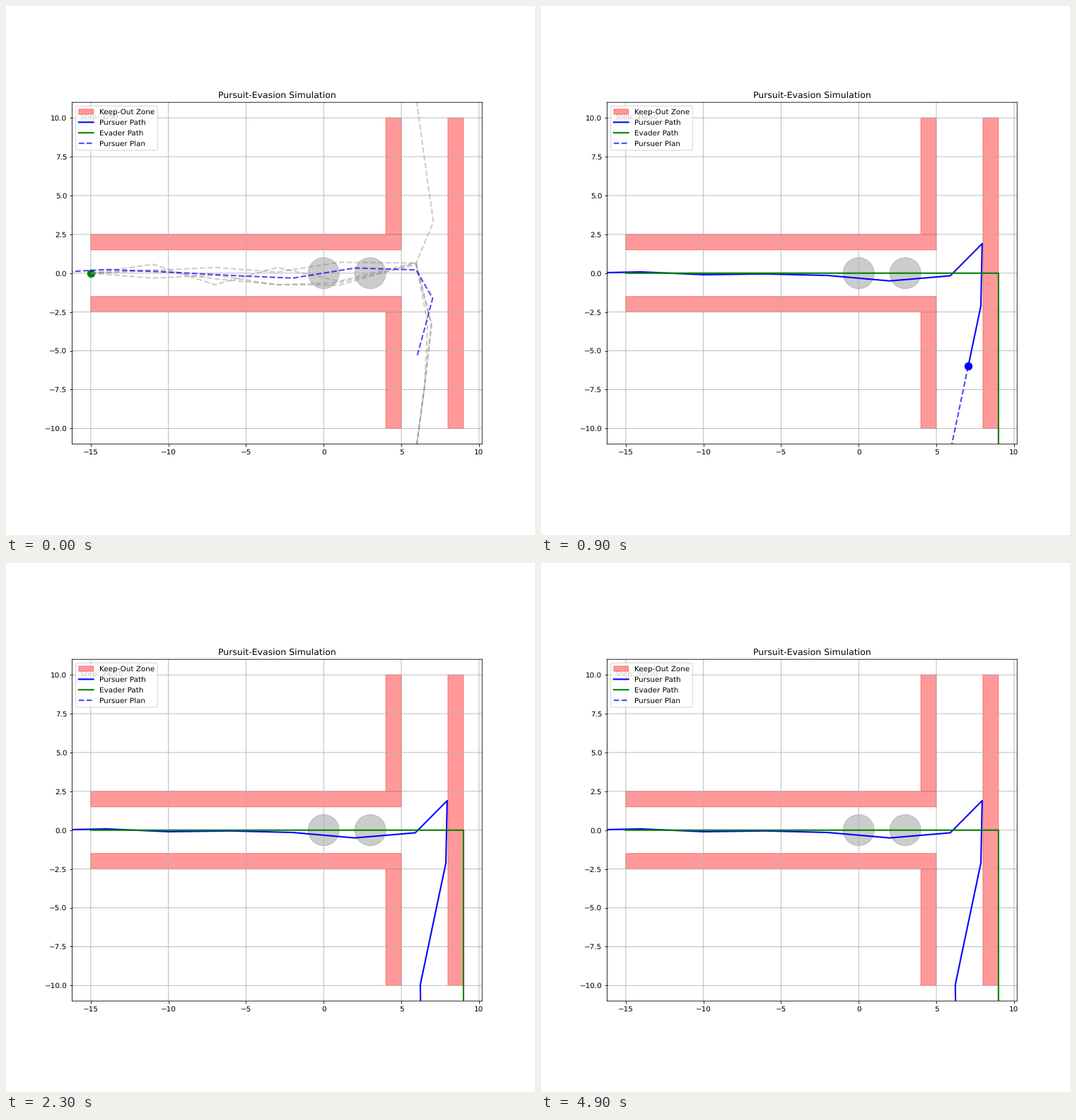
A matplotlib script that plays this animation: 748 px wide and 748 px high, repeating every 5000 ms.

```python
import numpy as np
import matplotlib.pyplot as plt
from matplotlib.animation import FuncAnimation
from matplotlib.patches import Circle, Rectangle

STEPS = 50
STEP_MS = 100
STRIDE = 4
ESCAPES = 4

PURSUER = np.array([
    (-18, 0), (-14, .08), (-10, -.1), (-6, -.05), (-2, -.15), (2, -.5),
    (5.9, -.17), (7.95, 1.9), (7.87, -2.1), (7.05, -6), (6.22, -9.95), (6.28, -13.95)])

# Smooth, unsnapped edges at fractional pixel positions.
plt.rcParams.update({"path.snap": False, "text.hinting": "none"})


def evader_path(step):
    """One stride per step: along the corridor, then straight down."""
    k = np.arange(step + 1)
    return np.column_stack([np.minimum(-15 + STRIDE * k, 9), -STRIDE * np.maximum(k - 6, 0)])


def corridor_plan(start, side, reach, spread, rng):
    """Wander through the corridor, then bend up or down towards x = 6."""
    points = [tuple(start)]
    points += [(x, rng.uniform(-spread, spread)) for x in np.arange(start[0] + STRIDE, 5, STRIDE)]
    if start[0] < 5.5:
        points.append((5.95, rng.uniform(0, spread)))
    points += [(rng.uniform(6.7, 7.1), .3 * side * reach), (6.5, .66 * side * reach),
               (6, side * reach)]
    return points


def favoured_side(step):
    return 1 if step % 2 else -1


def escape_plans(step):
    if step < 7:
        rng = np.random.default_rng(step)
        start, side = evader_path(step)[-1], favoured_side(step)
        return [corridor_plan(start, side if i else -side, 11, .8, rng) for i in range(ESCAPES)]
    if step < 19:
        return [[(6.1 - .5 * (-1) ** k, -12 + 3.45 * k) for k in range(step - 13)]]
    return []


def return_plan(mix):
    """Climb back into view; the wide arc straightens as mix goes from 0 to 1."""
    t = np.linspace(0, 1, 9)
    arc = 6 + 2.3 * np.sin(np.pi * t)
    climb = 6.2 + 1.6 * t ** .35
    return np.column_stack([(1 - mix) * arc + mix * climb, -12 + (6.5 + .7 * mix) * t])


def pursuer_plan(step):
    if step < 7:
        rng = np.random.default_rng(100 + step)
        return corridor_plan(PURSUER[step], favoured_side(step), 5.4, .35, rng)
    if step < 11:
        return [PURSUER[step], (6, -11)]
    if 13 <= step <= 18:
        return return_plan((step - 13) / 5)
    return []


def set_points(line, points):
    line.set_data(*np.reshape(points, (-1, 2)).T)


fig, ax = plt.subplots(figsize=(10, 10), dpi=74.8)
ax.set_aspect("equal")
ax.set_xlim(-16.2, 10.2)
ax.set_ylim(-11, 11)
ax.set_title("Pursuit-Evasion Simulation")
ax.grid(True)

walls = [(-15, 1.5, 20, 1), (-15, -2.5, 20, 1), (4, 2.5, 1, 7.5), (4, -10, 1, 7.5), (8, -10, 1, 20)]
for i, (x, y, w, h) in enumerate(walls):
    ax.add_patch(Rectangle((x, y), w, h, color="red", alpha=.4,
                           label="Keep-Out Zone" if i == 0 else None))
for x in (0, 3):
    ax.add_patch(Circle((x, 0), 1, color="gray", alpha=.4))

pursuer_line, = ax.plot([], [], "b-", lw=2, label="Pursuer Path")
evader_line, = ax.plot([], [], "g-", lw=2, label="Evader Path")
pursuer_dot, = ax.plot([], [], "bo", ms=10)
evader_dot, = ax.plot([], [], "go", ms=10)
escape_lines = [ax.plot([], [], "--", color="gray", lw=2, alpha=.4)[0] for _ in range(ESCAPES)]
plan_line, = ax.plot([], [], "b--", lw=2, alpha=.7, label="Pursuer Plan")
step_text = ax.text(.02, .95, "", transform=ax.transAxes)
ax.legend(loc="upper left")


def update(step):
    chased, chasing = evader_path(step), PURSUER[:step + 1]
    set_points(pursuer_line, chasing)
    set_points(evader_line, chased)
    set_points(pursuer_dot, chasing[-1])
    set_points(evader_dot, chased[-1])
    set_points(plan_line, pursuer_plan(step))
    plans = escape_plans(step)
    for i, line in enumerate(escape_lines):
        set_points(line, plans[i] if i < len(plans) else [])
    step_text.set_text(f"Step: {step + 1}/{STEPS}")


anim = FuncAnimation(fig, update, frames=STEPS, interval=STEP_MS, repeat=True, repeat_delay=0)
plt.show()
```
